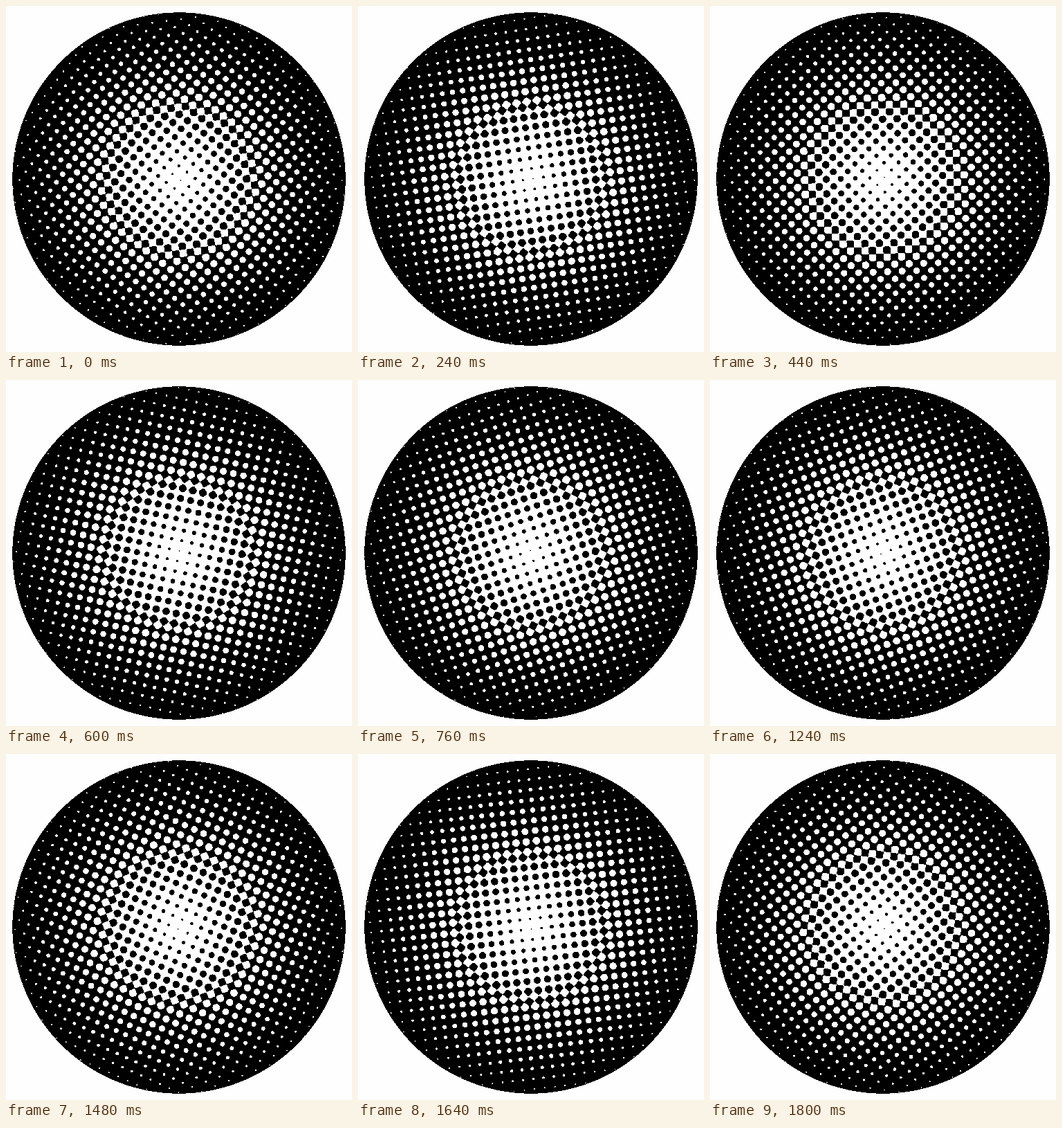
Animation of 500x500 px, one loop 1.84 s. Source, as an HTML page with a canvas:

```html
<!DOCTYPE html>
<html>
<head>
<meta charset="utf-8">
<title>Rotating halftone</title>
<style>
html, body { margin: 0; width: 100%; height: 100%; overflow: hidden; background: #fefefe; }
canvas { display: block; }
</style>
</head>
<body>
<canvas id="stage" width="500" height="500"></canvas>
<script>
const SIZE = 500, MID = SIZE / 2, RADIUS = 240.7;
const PITCH = 10.5 * Math.SQRT2, SHIFT = 3.1;
const STEP_MS = 40, STEPS = 46, TURN = 2 * Math.PI / 47;
const BLACK = 0xff000000, WHITE = 0xfffefefe, OUTSIDE = 9;

const ctx = document.getElementById('stage').getContext('2d');
const image = ctx.createImageData(SIZE, SIZE);
const pixels = new Uint32Array(image.data.buffer);
const levels = new Float32Array(SIZE * SIZE);

// Radial gradient: 1 is white, 0 is black
const lightness = r => (1 - (r / 250) ** 1.25) ** 1.65;

// Spot height at which a dot covers the given share of its cell (up to one half)
const cut = share =>
  1 - 4 / Math.PI * share - (1 - 2 / Math.PI) * (2 * share) ** 16;

// Round dots clipped by a diamond: black peaks at 0,0, white at 1,1
const spot = (x, y) => x + y <= 1
  ? 1 - x * x - y * y
  : (1 - x) ** 2 + (1 - y) ** 2 - 1;

// Distance to the nearest even number
const fold = q => Math.abs(q - 2 * Math.round(q / 2));

for (let i = 0; i < levels.length; i++) {
  const r = Math.hypot(i % SIZE + 0.5 - MID, Math.floor(i / SIZE) + 0.5 - MID);
  const light = lightness(Math.min(r, RADIUS));
  levels[i] = r > RADIUS ? OUTSIDE : light > 0.5 ? cut(1 - light) : -cut(light);
}

function draw(step) {
  const angle = Math.PI / 4 - (step + 1) * TURN;
  const k = 2 / PITCH;
  const c = Math.cos(angle) * k, s = Math.sin(angle) * k;
  for (let i = 0, row = 0; row < SIZE; row++) {
    const y = row + 0.5 - MID;
    for (let col = 0; col < SIZE; col++, i++) {
      const x = col + 0.5 - MID;
      const height = spot(fold(x * c + y * s - SHIFT * k), fold(y * c - x * s));
      pixels[i] = height > levels[i] ? BLACK : WHITE;
    }
  }
  ctx.putImageData(image, 0, 0);
}

let shown = -1;
function tick() {
  const step = Math.floor(performance.now() / STEP_MS) % STEPS;
  if (step !== shown) draw(shown = step);
  requestAnimationFrame(tick);
}
tick();
</script>
</body>
</html>
```
